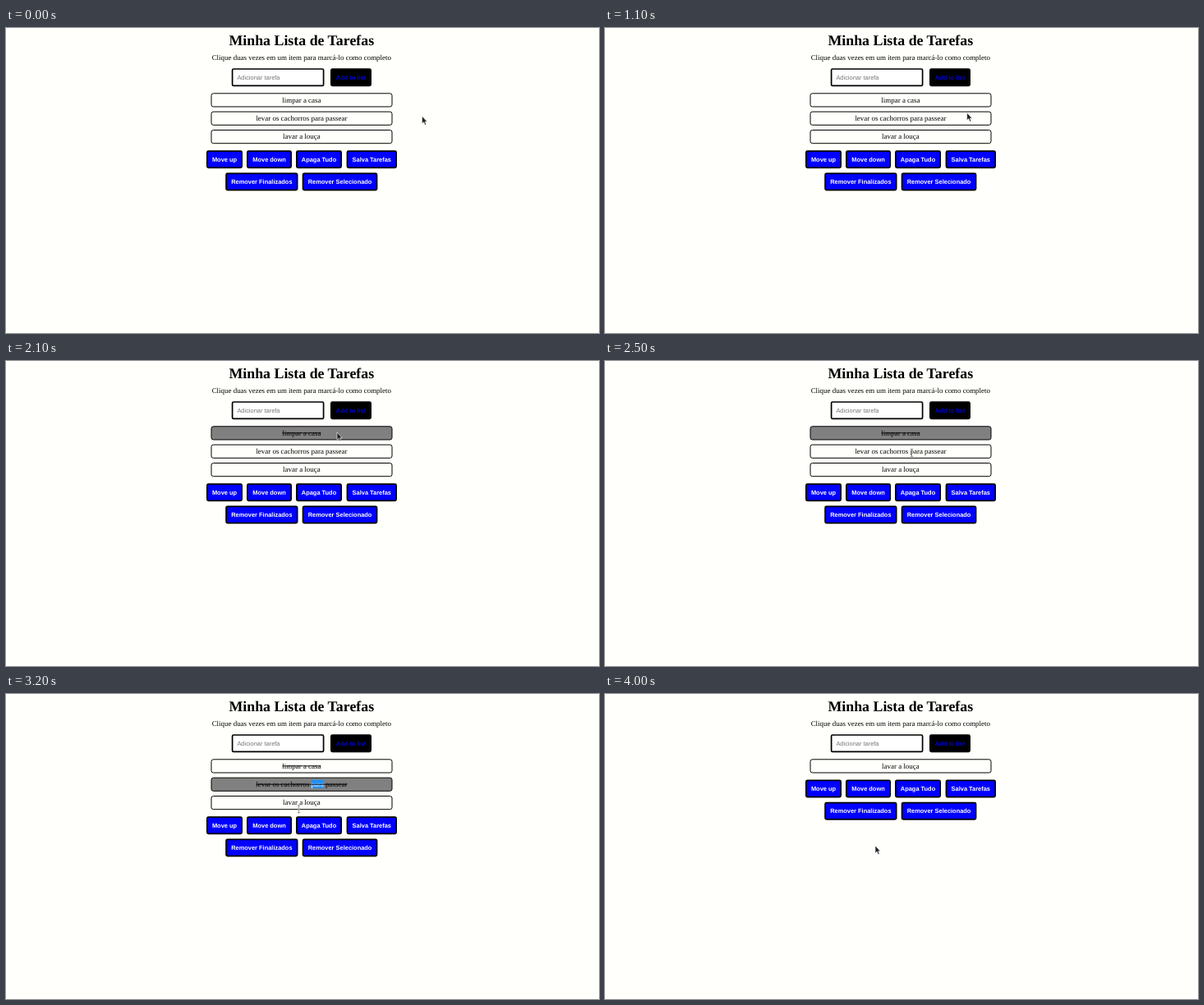
Write an HTML page that moves like this. It is 722 px wide and 372 px high and loops after 7.2 s.

```html
<!DOCTYPE html>
<html lang="pt-BR">
<head>
<meta charset="utf-8">
<title>Minha Lista de Tarefas</title>
<style>
  html, body { margin: 0; width: 100%; height: 100%; overflow: hidden; background: #fffffb; }
  svg { display: block; width: 722px; height: 372px; }
  text { font: 8.93px "Liberation Serif", serif; text-anchor: middle; text-rendering: geometricPrecision; white-space: pre; }
  .title { font-size: 17.85px; font-weight: bold; }
  .hint { font: 7.45px "Liberation Sans", sans-serif; text-anchor: start; fill: #757575; }
  .button text { font: bold 7.45px "Liberation Sans", sans-serif; fill: #fff; }
  .button rect { fill: #00f; stroke: #000; stroke-width: 1.7; }
  .add rect { fill: #000; }
  .add text { fill: #0000d8; }
  .task rect { fill: none; stroke: #000; }
  .selected > rect { fill: #808080; }
  .done > text { text-decoration: line-through; }
  .task .mark { fill: none; stroke: none; }
  .marked .mark { fill: #1e90ff; }
  .marked tspan { fill: #fff; }
</style>
</head>
<body>
<svg viewBox="0 0 722 372">
  <text class="title" x="359.8" y="20.6">Minha Lista de Tarefas</text>
  <text x="359.8" y="38.6">Clique duas vezes em um item para marcá-lo como completo</text>
  <rect x="275.6" y="50" width="111" height="20.4" rx="1.5" fill="#fff" stroke="#000" stroke-width="1.7"/>
  <text class="hint" x="281.4" y="62.8">Adicionar tarefa</text>
  <g id="tasks"></g>
  <g id="buttons"></g>
  <g id="add"></g>
  <g id="cursor">
    <path id="arrow" d="M0 0V9.2L2.1 7.3L3.7 10.8L5.2 10.1L3.7 6.8H6.3Z" fill="#222" stroke="#fff" stroke-width=".6"/>
    <g id="beam" fill="none">
      <path d="M-1.8 0H1.8M0 0V9M-1.8 9H1.8" stroke="#fff" stroke-width="1.5"/>
      <path d="M-1.8 0H1.8M0 0V9M-1.8 9H1.8" stroke="#333" stroke-width=".5"/>
    </g>
  </g>
</svg>
<script>
const LOOP = 7200, STEP = 100, ROW = 22.35;
const $ = id => document.getElementById(id);

const button = (label, left, right, top, kind = '') => `<g class="button ${kind}">
  <rect x="${left + .85}" y="${top + .85}" width="${right - left - 1.7}" height="20.3" rx="1.6"/>
  <text x="${(left + right) / 2}" y="${top + 13.6}">${label}</text></g>`;

const task = label => `<g class="task">
  <rect x="250" y="79.8" width="220" height="16.2" rx="2.5"/>
  <rect class="mark" x="371.7" y="82.4" width="15.4" height="10"/>
  <text x="359.9" y="90.5">${label}</text></g>`;

$('tasks').innerHTML = [
  'limpar a casa', 'levar os cachorros <tspan>para</tspan> passear', 'lavar a louça'
].map(task).join('');
$('buttons').innerHTML =
  button('Move up', 244, 288, 149.2) + button('Move down', 293, 348, 149.2) +
  button('Apaga Tudo', 353, 409, 149.2) + button('Salva Tarefas', 414.6, 476, 149.2) +
  button('Remover Finalizados', 267.2, 355.5, 176.5) +
  button('Remover Selecionado', 360.7, 452.4, 176.5);
$('add').innerHTML = button('Add to list', 395, 445, 49.2, 'add');

// Pointer stops: time, x, y
const path = [
  [0, 506.5, 107.5], [400, 506.5, 107.5], [500, 499, 106], [700, 477, 102.2],
  [900, 458, 102], [1200, 432, 104], [1500, 405, 89], [1600, 403, 87],
  [2100, 403, 87], [2500, 373.5, 107.5], [3000, 373.5, 107.5],
  [3300, 348, 150], [3500, 330.8, 181], [3900, 330.8, 181], [4000, 329, 185], [LOOP, 329, 185]
];

function pointerAt(t) {
  const i = path.findIndex(stop => stop[0] > t);
  const [t0, x0, y0] = path[i - 1], [t1, x1, y1] = path[i];
  const k = (t - t0) / (t1 - t0);
  return [x0 + (x1 - x0) * k, y0 + (y1 - y0) * k];
}

const [first, second, third] = $('tasks').children;
const place = (element, x, y) => element.setAttribute('transform', `translate(${x} ${y})`);
const show = (element, on) => element.setAttribute('display', on ? 'inline' : 'none');

function render(t) {
  const removed = t >= 4000;
  show(first, !removed);
  show(second, !removed);
  place(second, 0, ROW);
  place(third, 0, removed ? 0 : 2 * ROW);
  place($('buttons'), 0, removed ? -2 * ROW : 0);

  first.classList.toggle('selected', t >= 1700 && t < 2700);
  first.classList.toggle('done', t >= 1900);
  second.classList.toggle('selected', t >= 2700);
  second.classList.toggle('marked', t >= 2800);
  second.classList.toggle('done', t >= 2900);

  const [x, y] = pointerAt(t);
  const overText = (x > 304 && x < 416 && y > 104 && y < 115) ||
                   (!removed && x > 337 && x < 383 && y > 127 && y < 138);
  show($('arrow'), !overText);
  show($('beam'), overText);
  place($('cursor'), x, y);
}

const start = performance.now();
function tick() {
  const t = (performance.now() - start) % LOOP;
  render(Math.floor(t / STEP) * STEP);
  requestAnimationFrame(tick);
}
tick();
</script>
</body>
</html>
```
